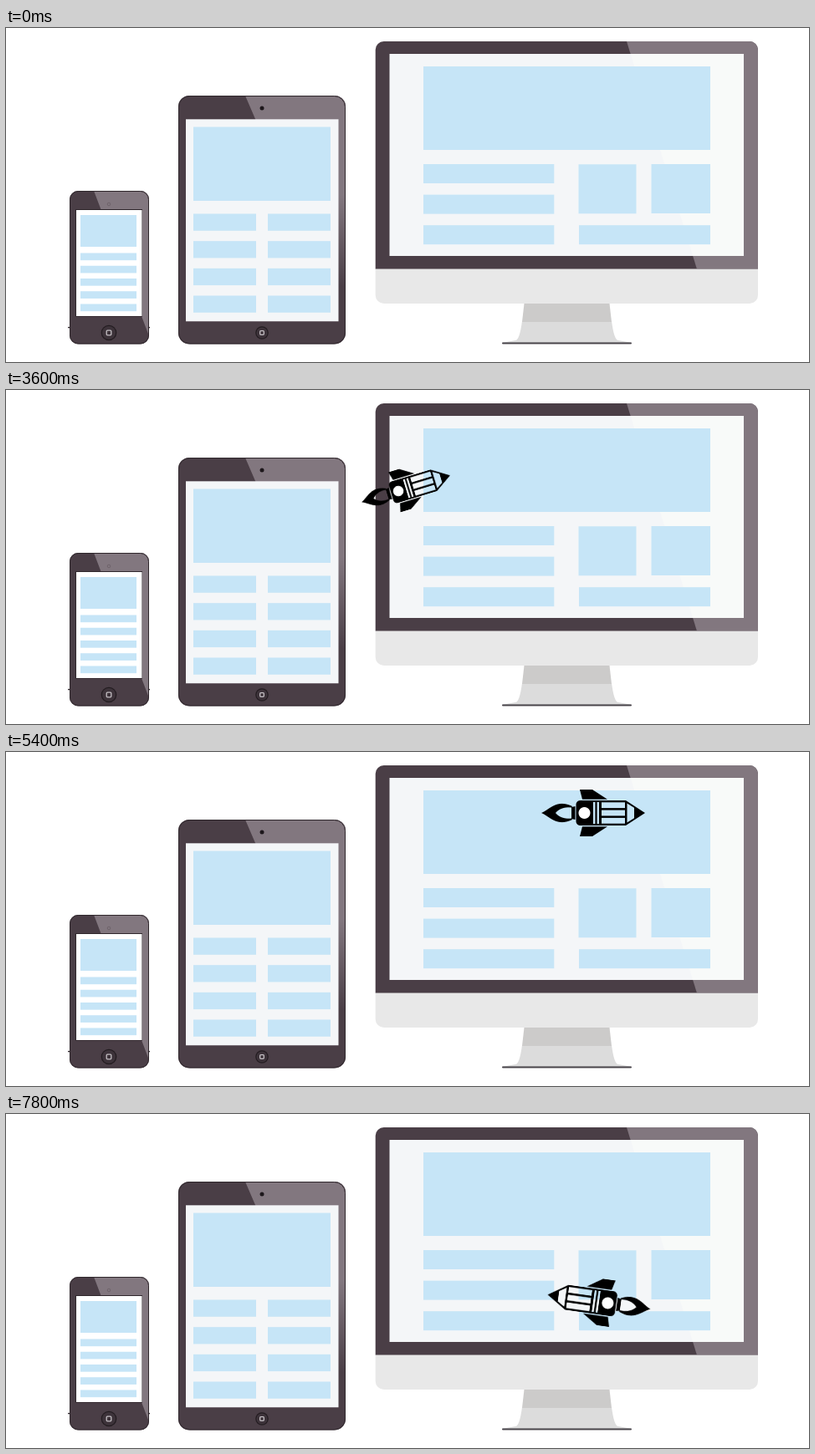
Recreate the animation shown at these times as an HTML page with a canvas. Size 960x400 px, loop 8 s.

```html
<!DOCTYPE html>
<html lang="en">
<head>
<meta charset="utf-8">
<title>Responsive devices</title>
<style>
  html, body { margin: 0; width: 100%; height: 100%; overflow: hidden; background: #fff; }
  canvas { display: block; width: 960px; height: 400px; }
</style>
</head>
<body>
<canvas id="stage" width="960" height="400"></canvas>
<script>
const LOOP = 8000, STEP = 300;
const BODY = '#4a3e46', SHEEN = '#82777f', SCREEN = '#f4f6f8', BLOCK = '#c6e5f7', EDGE = '#2f272c';

function layer(w, h) {
  const c = document.createElement('canvas');
  c.width = w;
  c.height = h;
  return c;
}

// Rectangles are given by their left, top, right and bottom edges.
function box(g, fill, l, t, r, b) {
  g.fillStyle = fill;
  g.fillRect(l, t, r - l, b - t);
}

function roundBox(g, l, t, r, b, radius) {
  g.beginPath();
  g.roundRect(l, t, r - l, b - t, radius);
}

function poly(g, fill, ...pts) {
  g.fillStyle = fill;
  g.beginPath();
  for (let i = 0; i < pts.length; i += 2) g.lineTo(pts[i], pts[i + 1]);
  g.closePath();
  g.fill();
}

function disc(g, x, y, r, fill) {
  g.fillStyle = fill;
  g.beginPath();
  g.arc(x, y, r, 0, Math.PI * 2);
  g.fill();
}

function stroke(g, color, width) {
  g.strokeStyle = color;
  g.lineWidth = width;
  g.stroke();
}

// Equal blocks stacked at an even pitch.
function rows(g, l, r, top, pitch, height, count) {
  for (let i = 0; i < count; i++) {
    const y = top + i * pitch;
    box(g, BLOCK, l, y, r, y + height);
  }
}

// Device case whose sheen covers all that lies right of a slanted line.
function shell(g, l, t, r, b, radius, x, slope, shine) {
  g.save();
  roundBox(g, l, t, r, b, radius);
  g.fillStyle = BODY;
  g.fill();
  g.clip();
  poly(g, shine, x, t, r, t, r, b, x + slope * (b - t), b);
  g.restore();
}

function outline(g, l, t, r, b, radius) {
  roundBox(g, l + .5, t + .5, r - .5, b - .5, radius);
  stroke(g, EDGE, 1);
}

function homeButton(g, x, y, r) {
  const s = r * .3;
  disc(g, x, y, r, '#231c20');
  disc(g, x, y, r - 1.2, '#3d333a');
  roundBox(g, x - s, y - s, x + s, y + s, 1);
  stroke(g, '#c4bfc3', 1.3);
}

function drawPhone(g) {
  box(g, EDGE, 74, 358, 172, 359.3);
  shell(g, 76, 195, 171, 378.5, 10, 105, .38, SHEEN);
  outline(g, 76, 195, 171, 378.5, 10);
  box(g, EDGE, 83, 217, 163, 345.7);
  box(g, '#fff', 84, 218, 162.5, 345);
  box(g, BLOCK, 89, 224, 156, 262);
  rows(g, 89, 156, 269.5, 15.25, 8.7, 5);
  g.beginPath();
  g.arc(123, 211, 1.8, 0, Math.PI * 2);
  stroke(g, '#6a5f66', .8);
  homeButton(g, 123, 365, 9.3);
}

function drawTablet(g) {
  const fade = g.createLinearGradient(0, 200, 0, 310);
  fade.addColorStop(0, SHEEN);
  fade.addColorStop(1, BODY);
  shell(g, 206, 81, 406, 378.5, 13, 286, .43, fade);
  outline(g, 206, 81, 406, 378.5, 13);
  box(g, SCREEN, 215, 109.3, 397.5, 351.3);
  box(g, BLOCK, 224, 118.5, 388, 207);
  for (const x of [224, 313]) rows(g, x, x + 75, 222.5, 32.67, 20.3, 4);
  disc(g, 306, 96, 2.5, '#1d171b');
  homeButton(g, 306, 365, 7.8);
}

function drawMonitor(g) {
  const slope = .308;
  shell(g, 441.7, 16, 899, 288.7, [10, 10, 0, 0], 742, slope, SHEEN);
  roundBox(g, 441.7, 288.7, 899, 330, [0, 0, 10, 10]);
  g.fillStyle = '#e8e8e8';
  g.fill();

  box(g, SCREEN, 458.5, 31, 882, 273);
  poly(g, '#f8faf9', 742 + slope * 15, 31, 882, 31, 882, 273, 742 + slope * 257, 273);
  box(g, BLOCK, 499, 46, 842, 146);
  rows(g, 499, 655.3, 163, 36.6, 23, 3);
  rows(g, 684.5, 753.5, 163.3, 0, 59, 1);
  rows(g, 771.5, 842, 163, 0, 59, 1);
  rows(g, 685, 842, 236.2, 0, 23, 1);

  g.fillStyle = '#dcdcdc';
  g.beginPath();
  g.moveTo(617, 351);
  g.lineTo(724, 351);
  g.quadraticCurveTo(727, 374, 732, 374);
  g.lineTo(748, 377);
  g.lineTo(593, 377);
  g.lineTo(609, 374);
  g.quadraticCurveTo(614, 374, 617, 351);
  g.fill();
  poly(g, '#cccbca', 619.5, 330, 721.5, 330, 724, 352, 617, 352);
  roundBox(g, 593, 376.5, 748, 378.5, 1);
  g.fillStyle = '#48444a';
  g.fill();
}

// Points right, centred on the origin; each half mirrors the other
// and the gaps are see-through.
function drawRocket(g) {
  for (const side of [1, -1]) {
    g.save();
    g.scale(1, side);
    g.fillStyle = '#000';
    g.beginPath();
    g.moveTo(-62, 0);
    g.bezierCurveTo(-52, -4, -44, -17, -25, -8);
    g.lineTo(-26, -6.5);
    g.bezierCurveTo(-34, -7.5, -41, -5, -45, 0);
    g.fill();
    poly(g, '#000', -16, -28, -1, -28, 17, -16.3, -13, -16.3);
    g.restore();
  }
  poly(g, '#000', -26, -7, -21.5, -8, -21.5, 8, -26, 7);
  roundBox(g, -20.5, -15, 39, 15, [5, 0, 0, 5]);
  g.fill();
  poly(g, '#000', 39, -15, 62, 0, 39, 15);

  g.globalCompositeOperation = 'destination-out';
  for (const x of [0, 4.6]) box(g, '#000', x, -13, x + 2.4, 13);
  for (const y of [-9.3, 0, 9.3]) box(g, '#000', 10, y - 3.4, 38, y + 3.4);
  poly(g, '#000', 40.5, -11.5, 49, -6.2, 49, 6.2, 40.5, 11.5);
  g.globalCompositeOperation = 'source-over';
  disc(g, -10.5, 0, 7, '#fff');
}

const backdrop = layer(960, 400);
const bg = backdrop.getContext('2d');
box(bg, '#fff', 0, 0, 960, 400);
drawPhone(bg);
drawTablet(bg);
drawMonitor(bg);

const RES = 4;
const rocket = layer(140 * RES, 70 * RES);
const rg = rocket.getContext('2d');
rg.scale(RES, RES);
rg.translate(70, 35);
drawRocket(rg);

// Waypoints: step, x, y.
const PATH = [
  [1, 114, 325], [5, 253, 220], [9, 322, 175], [14, 582, 80.5], [18, 702, 73],
  [21, 803, 72.5], [22, 852, 150], [23, 817, 230.5], [26, 709, 225]
];

const ramp = (v, from, to) => Math.min(1, Math.max(0, (v - from) / (to - from)));

function place(step) {
  const i = Math.max(1, PATH.findIndex(p => p[0] >= step));
  const [s0, x0, y0] = PATH[i - 1], [s1, x1, y1] = PATH[i];
  const k = ramp(step, s0, s1);
  return [x0 + (x1 - x0) * k, y0 + (y1 - y0) * k];
}

// Climbs at a slant, levels off, then swings round at the far edge.
function heading(step) {
  const climb = (1 - ramp(step, 9, 18)) ** 1.8;
  return -35 * climb + 180 * ramp(step, 21, 23) + 8 * ramp(step, 23, 26);
}

// Grows on the way to each larger device.
const size = step => .54 + .19 * ramp(step, 1, 5) + .27 * ramp(step, 9, 14);

const ctx = document.getElementById('stage').getContext('2d');
ctx.imageSmoothingQuality = 'high';

function render(time) {
  const step = Math.floor(time % LOOP / STEP);
  ctx.drawImage(backdrop, 0, 0);
  if (step === 0) return;
  ctx.save();
  ctx.translate(...place(step));
  ctx.rotate(heading(step) * Math.PI / 180);
  ctx.scale(size(step), size(step));
  ctx.drawImage(rocket, -70, -35, 140, 70);
  ctx.restore();
}

const start = performance.now();
function tick() {
  render(performance.now() - start);
  requestAnimationFrame(tick);
}
tick();
</script>
</body>
</html>
```
